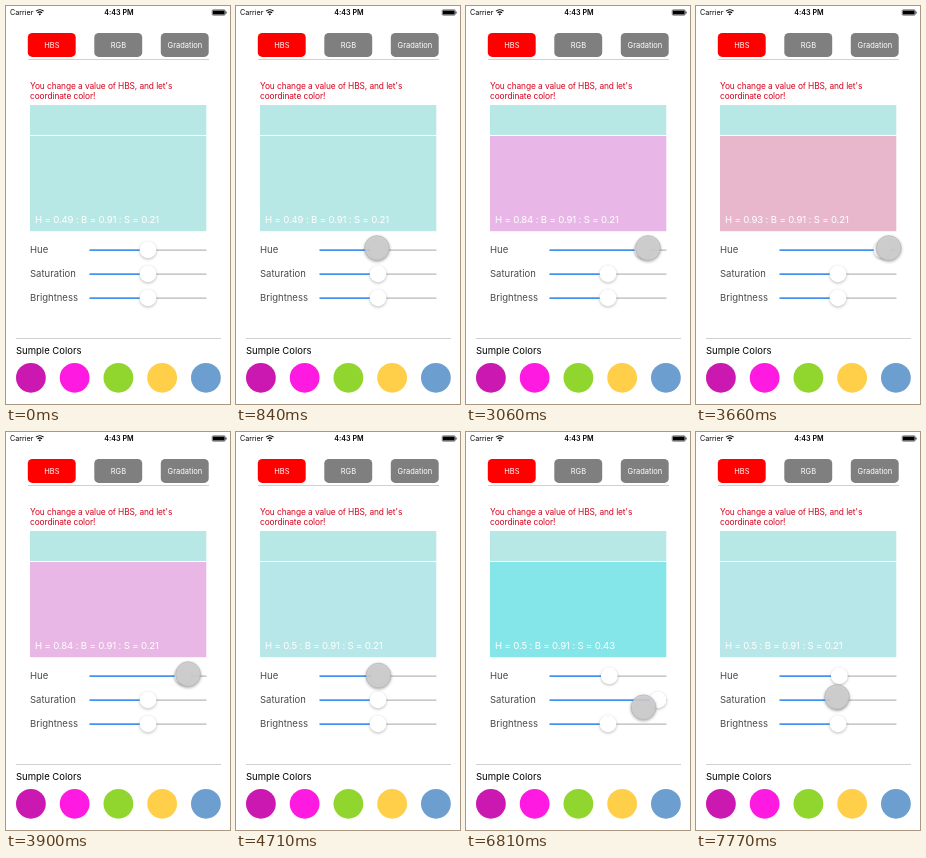
An HTML page that plays this animation: 224x398 px, repeating every 8 s.

```html
<!DOCTYPE html>
<html lang="en">
<head>
<meta charset="utf-8">
<title>HBS sliders</title>
<style>
  html, body { margin: 0; width: 100%; height: 100%; overflow: hidden; background: #fff; }
  svg { display: block; width: 224px; height: 398px; font: 9.5px Inter, sans-serif; }
  .status { font-size: 7.15px; }
  .tab { font-size: 7.5px; fill: #fff; text-anchor: middle; }
  .hint { font-size: 8.4px; letter-spacing: -.1px; fill: #d6001c; }
  .label { fill: #4a4a4a; }
  .track { stroke-width: 1.3; stroke-linecap: round; }
  .thumb { fill: #fff; filter: drop-shadow(0 1.4px 1.4px rgba(0, 0, 0, .27)); }
  #readout { font-size: 9.6px; letter-spacing: -.15px; fill: #fff; }
  #touch { fill: #d0d0d0; fill-opacity: .88; stroke: #b4b4b4; stroke-width: .7;
    filter: drop-shadow(0 1px 1.8px rgba(0, 0, 0, .38)); }
</style>
</head>
<body>
<svg viewBox="0 0 224 398">
  <g class="status">
    <text x="4" y="9">Carrier</text>
    <path d="M30 5.2a5.6 5.6 0 0 1 7.6 0M31.5 6.9a3.4 3.4 0 0 1 4.6 0" fill="none" stroke="#000" stroke-width="1.1"/>
    <path d="M32.5 8.1a1.9 1.9 0 0 1 2.6 0l-1.3 1.4z"/>
    <text x="113" y="9" font-weight="600" text-anchor="middle">4:43 PM</text>
    <rect x="206.2" y="3.8" width="13" height="5.4" rx="1" fill="none" stroke="#000" stroke-width=".5"/>
    <rect x="206.8" y="4.4" width="11.8" height="4.2" rx=".5"/>
    <rect x="219.6" y="5.4" width=".9" height="2.2" rx=".4"/>
  </g>
  <g id="tabs"></g>
  <path d="M22 53.5H203" stroke="#d0d0d0"/>
  <text class="hint" x="24" y="83">You change a value of HBS, and let's</text>
  <text class="hint" x="24" y="92.5">coordinate color!</text>
  <rect id="base" x="24" y="99" width="176.3" height="30"/>
  <rect id="mix" x="24" y="130" width="176.3" height="95.2"/>
  <text id="readout" x="29" y="216.5"></text>
  <g id="sliders"></g>
  <path d="M10 332.5H215" stroke="#d0d0d0"/>
  <text x="10" y="348">Sumple Colors</text>
  <g id="swatches"></g>
  <circle id="touch" r="12.3"/>
</svg>
<script>
const $ = id => document.getElementById(id);
const clamp = (v, lo, hi) => Math.min(hi, Math.max(lo, v));
const ease = u => u * u * (3 - 2 * u);
const sliderY = i => 244.1 + i * 24;
const REST = 142, MAX = 192;

$('tabs').innerHTML = ['HBS', 'RGB', 'Gradation'].map((name, i) => {
  const x = 21.8 + i * 66.5;
  return `<rect x="${x}" y="27" width="47.9" height="23.9" rx="4.5" fill="${i ? '#7f7f7f' : '#f00'}"/>
    <text class="tab" x="${x + 24.1}" y="41.8">${name}</text>`;
}).join('');

$('sliders').innerHTML = ['Hue', 'Saturation', 'Brightness'].map((name, i) => {
  const y = sliderY(i);
  return `<text class="label" x="24" y="${y + 2.9}">${name}</text>
    <path class="track" d="M84 ${y}H200" stroke="#b8b8b8"/>
    <path class="track" id="fill${i}" stroke="#1a82fb"/>
    <circle class="thumb" id="thumb${i}" cy="${y - .2}" r="8.4"/>`;
}).join('');

$('swatches').innerHTML = ['#cb18b1', '#ff1ae2', '#91d62e', '#ffcf49', '#6c9fcf'].map((color, i) =>
  `<circle cx="${24.9 + i * 43.75}" cy="371.8" r="14.9" fill="${color}"/>`).join('');

// Each move eases the finger to a new x and/or y
const origin = { x: 189, y: 278 };
const moves = [
  { from: 270, to: 840, x: 141, y: 242 },
  { from: 1350, to: 1950, x: 165.5 },
  { from: 2370, to: 2760, x: 182 },
  { from: 3060, to: 3330, x: 210 },
  { from: 3330, to: 3840, x: 186 },
  { from: 3840, to: 4170, x: 142.5, y: 243.5 },
  { from: 4710, to: 4860, y: 261.5 },
  { from: 5040, to: 5280, y: 248 },
  { from: 5460, to: 5670, x: 143, y: 266 },
  { from: 5880, to: 6540, x: 210, y: 267 },
  { from: 6720, to: 6850, x: 168.5, y: 277.5 },
  { from: 6850, to: 7200, x: 193, y: 266 },
  { from: 7350, to: 7770, x: 141, y: 265 }
];

function finger(t) {
  let { x, y } = origin;
  for (const move of moves) {
    const u = ease(clamp((t - move.from) / (move.to - move.from), 0, 1));
    x += ((move.x ?? x) - x) * u;
    y += ((move.y ?? y) - y) * u;
  }
  return { x, y };
}

function hsb(h, s, b) {
  const channel = n => {
    const k = (n + h * 6) % 6;
    return Math.round(255 * b * (1 - s * clamp(Math.min(k, 4 - k), 0, 1)));
  };
  return `rgb(${channel(5)},${channel(3)},${channel(1)})`;
}

function format(value) {
  const n = Math.round(value * 100) / 100;
  return Number.isInteger(n) ? n.toFixed(1) : String(n);
}

function setSlider(i, x) {
  $('thumb' + i).setAttribute('cx', x);
  $('fill' + i).setAttribute('d', `M84 ${sliderY(i)}H${x}`);
}

function draw(t) {
  // Sliders follow the finger only while it is dragging them
  const hueTime = clamp(t, 1350, 4170);
  const satTime = t > 6540 && t < 7350 ? 6540 : Math.max(t, 5880);
  const hueX = clamp(REST + (finger(hueTime).x - 141) * .85, 92, MAX);
  const satX = clamp(finger(satTime).x - 1, REST, MAX);
  const h = .49 + (hueX - REST) / 100, s = .21 + (satX - REST) * .0044, b = .91;

  setSlider(0, hueX);
  setSlider(1, satX);
  $('mix').setAttribute('fill', hsb(h, s, b));
  $('readout').textContent = `H = ${format(h)} : B = ${format(b)} : S = ${format(s)}`;

  const { x, y } = finger(t);
  $('touch').setAttribute('cx', x);
  $('touch').setAttribute('cy', y);
  $('touch').setAttribute('visibility', t < 270 ? 'hidden' : 'visible');
}

setSlider(2, REST);
$('base').setAttribute('fill', hsb(.49, .21, .91));

const start = performance.now();
function tick() {
  draw((performance.now() - start) % 8000);
  requestAnimationFrame(tick);
}
tick();
</script>
</body>
</html>
```
